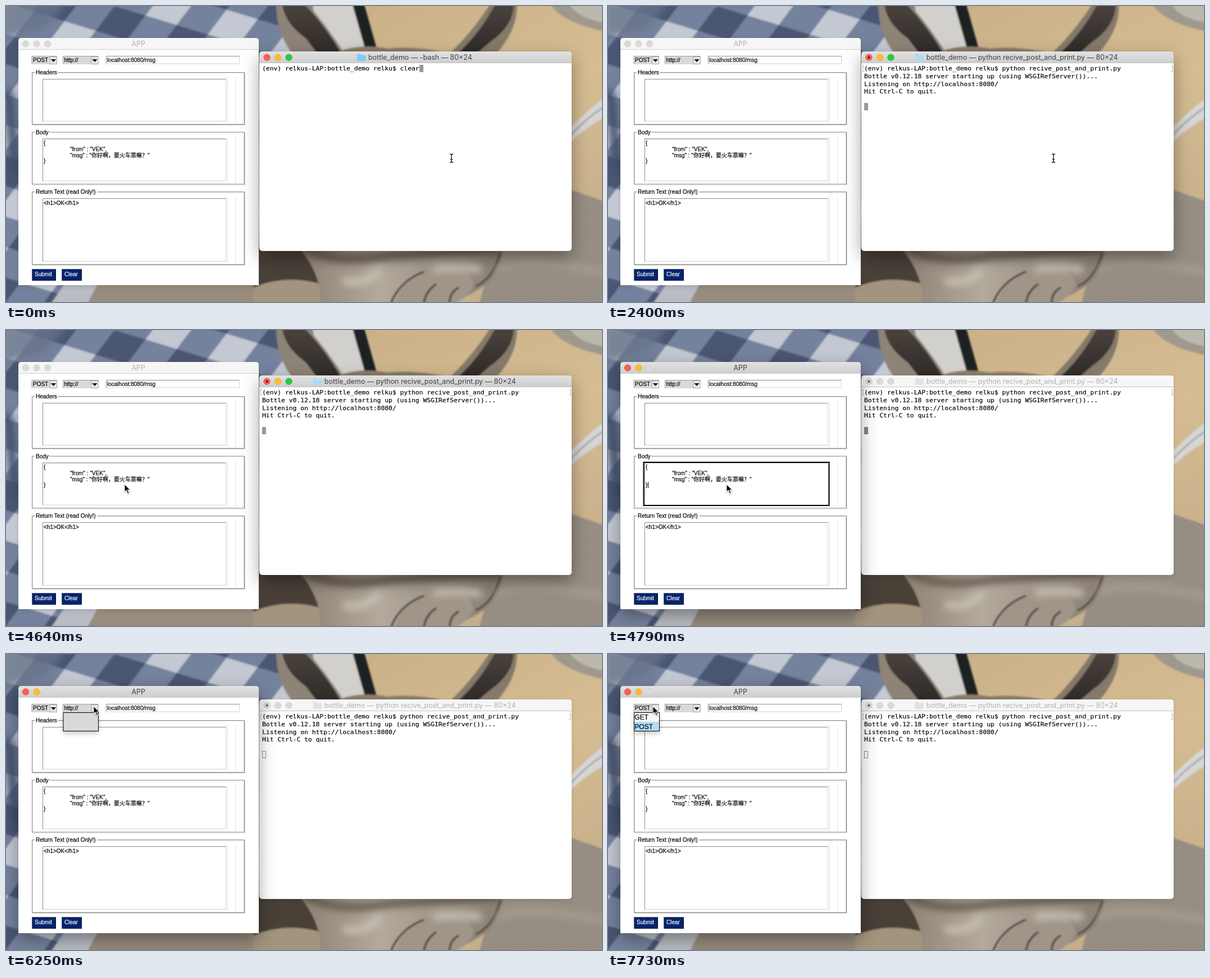
An HTML page for the animation above (8000 ms loop, 1061 by 528 pixels).

```html
<!DOCTYPE html>
<html lang="en">
<head>
<meta charset="utf-8">
<title>Request tool and terminal</title>
<style>
html, body { margin: 0; width: 100%; height: 100%; overflow: hidden; }
#stage { position: relative; width: 1061px; height: 528px; overflow: hidden; background: #cdb48a; }
svg { position: absolute; left: 0; top: 0; display: block; }
.win { position: absolute; background: #fff; }
.win svg { width: 100%; height: 100%; }
#app { left: 22px; top: 57px; width: 428px; height: 441px; border-radius: 5px 5px 0 0; }
#term { left: 451px; top: 81px; width: 556px; height: 356px; border-radius: 5px; }
#app svg { border-radius: 5px 5px 0 0; }
#term svg { border-radius: 5px; }
.win { box-shadow: 0 0 1px rgba(0,0,0,.4), 0 3px 9px rgba(0,0,0,.1); }
.win.active { z-index: 1; box-shadow: 0 0 1px rgba(0,0,0,.5), 0 11px 30px rgba(0,0,0,.36); }
#pointer { z-index: 3; }
text { white-space: pre; }
.ui { font: 10px "Liberation Sans", Arial, "Noto Sans CJK SC", "Noto Sans CJK", sans-serif; }
.ui text { stroke: currentColor; stroke-width: .2; }
.ui .label { color: #fff; }
.list text { font-size: 12px; }
.title { font: 12.45px Inter, "Open Sans", sans-serif; text-anchor: middle; fill: #b2b2b2; }
.mono { font: 11.34px "DejaVu Sans Mono", monospace; }
.mono text { stroke: #000; stroke-width: .15; }
.bar { fill: #f6f6f6; }
.active .bar { fill: url(#chrome); }
.active .title { fill: #404040; }
.light { fill: #dadada; stroke: #c9c9c9; stroke-width: .6; }
.active .red { fill: #fc5b57; stroke: #e0443e; }
.active .yellow { fill: #fdbc2e; stroke: #dea123; }
.active .green { fill: #29c83f; stroke: #1aab29; }
.folder { fill: #e2e2e2; }
.active .folder { fill: #7cccf5; }
.active .busy .folder { fill: #a9dcf6; }
.list { filter: drop-shadow(0 4px 4px rgba(0,0,0,.22)); }
.hide { display: none; }
</style>
</head>
<body>
<div id="stage">
<svg id="wall" width="1061" height="528">
  <defs>
    <pattern id="check" width="116" height="104" patternUnits="userSpaceOnUse" patternTransform="translate(82 -34) rotate(17) skewX(-20)">
      <rect width="116" height="104" fill="#75829d"/>
      <rect width="58" height="52" fill="#4b5773"/>
      <rect x="58" y="52" width="58" height="52" fill="#c3c8d3"/>
    </pattern>
    <pattern id="weave" width="6" height="6" patternUnits="userSpaceOnUse" patternTransform="rotate(32)">
      <rect width="6" height="6" fill="#9d958a"/>
      <path d="M0 1.5H6M1.5 0V6" stroke="#857d73"/>
    </pattern>
    <linearGradient id="wood" x2="1" y2="1">
      <stop stop-color="#bfa67c"/><stop offset=".6" stop-color="#d5bc92"/><stop offset="1" stop-color="#bfa988"/>
    </linearGradient>
    <linearGradient id="ear" x2="0" y2="1">
      <stop stop-color="#4c443e"/><stop offset="1" stop-color="#2c2827"/>
    </linearGradient>
    <linearGradient id="fur" x2="1">
      <stop stop-color="#8c8072"/><stop offset=".4" stop-color="#b3aa9d"/><stop offset="1" stop-color="#877d72"/>
    </linearGradient>
    <filter id="soft"><feGaussianBlur stdDeviation="1.5"/></filter>
    <filter id="blur"><feGaussianBlur stdDeviation="7"/></filter>
  </defs>
  <rect width="1061" height="528" fill="url(#wood)"/>
  <g filter="url(#soft)">
    <path d="M-9-9H580L600 90H450V460L170 540H-9Z" fill="url(#check)"/>
    <path d="M140 540L165 490H470V540Z" fill="#978c7d"/>
    <path d="M74 540L108 490H166L140 540Z" fill="#b9bcc3"/>
    <path d="M545-9H622L658 90H560Z" fill="#d2d0cd"/>
    <path d="M615-9H636L664 90H643Z" fill="#1f2022"/>
    <path d="M570 90Q620 64 680 76Q740 70 810 90Z" fill="#8a7c69"/>
    <path d="M481-9Q480 52 514 90H606Q574 38 532-9Z" fill="#8e8377"/>
    <path d="M491-9Q494 30 534 58L558 90H600Q570 36 526-9Z" fill="url(#ear)"/>
    <path d="M909-9Q914 42 868 90H784Q828 50 866-9Z" fill="#857969"/>
    <path d="M904-9Q906 34 862 64L832 90H798Q844 50 874-9Z" fill="url(#ear)"/>
    <path d="M965-9Q986 30 1070 46V-9Z" fill="#9f998d"/>
    <path d="M1000-9Q1012 22 1070 30V-9Z" fill="#bdb8ae"/>
    <path d="M1070 160Q1034 186 1000 222V247Q1040 210 1070 197Z" fill="#d6d6d6"/>
    <path d="M1070 176Q1030 202 1000 236" fill="none" stroke="#a8a8a9" stroke-width="3"/>
    <path d="M1000 326L1070 350V540H840L870 430H1000Z" fill="url(#weave)"/>
    <path d="M440 430H560Q550 470 590 540H440Z" fill="#494039"/>
    <path d="M440 502Q500 478 560 496V540H440Z" fill="#a3947d"/>
    <path d="M522 430H884Q884 470 858 494Q800 540 700 540H556Q570 492 522 430Z" fill="url(#fur)"/>
    <path d="M690 540Q702 478 770 466Q824 460 832 496Q826 526 770 540Z" fill="#9f9588"/>
    <path d="M682 540Q696 492 744 474M744 540Q742 512 766 496M790 534Q788 512 806 502M836 500Q866 488 880 440" fill="none" stroke="#5a5047" stroke-width="4"/>
  </g>
  <g filter="url(#blur)">
    <path d="M-9-9H110L70 40L-9 60Z" fill="#68748a" opacity=".8"/>
    <path d="M530 430Q580 462 680 446L880 432" fill="none" stroke="#5d5147" stroke-width="12"/>
    <path d="M600 490Q640 500 665 470M760 470Q800 462 846 470" fill="none" stroke="#cbc3b8" stroke-width="12"/>
    <path d="M4 150L18 300" stroke="#414d69" stroke-width="16"/>
    <path d="M870 470Q920 446 1070 476" fill="none" stroke="#b3a999" stroke-width="12" opacity=".6"/>
  </g>
</svg>

<div id="app" class="win"><svg viewBox="22 57 428 441">
  <defs><linearGradient id="chrome" x2="0" y2="1"><stop stop-color="#e2e2e2"/><stop offset="1" stop-color="#cdcdcd"/></linearGradient></defs>
  <rect class="bar" x="22" y="57" width="428" height="21"/>
  <path d="M22 77.5H450" stroke="#d0d0d0"/>
  <circle class="light red" cx="35" cy="67.5" r="5.8"/>
  <circle class="light yellow" cx="54.5" cy="67.5" r="5.8"/>
  <circle class="light" cx="74" cy="67.5" r="5.8"/>
  <text class="title" x="235.7" y="72.3">APP</text>
  <g id="form" class="ui"></g>
  <g id="focus">
    <rect x="63.5" y="236" width="330" height="77" fill="none" stroke="#000" stroke-width="2"/>
    <path id="caret" d="M71.5 271V282" stroke="#000"/>
  </g>
  <g id="lists" class="ui"></g>
</svg></div>

<div id="term" class="win"><svg viewBox="451 81 556 356">
  <rect class="bar" x="451" y="81" width="556" height="21"/>
  <path d="M451 101.5H1007" stroke="#c4c4c4"/>
  <circle class="light red" cx="464.5" cy="91.7" r="5.8"/>
  <circle class="light yellow" cx="484" cy="91.7" r="5.8"/>
  <circle class="light green" cx="503.5" cy="91.7" r="5.8"/>
  <g id="head">
    <path id="folder" class="folder" d="M0 1.5Q0 0 1.5 0H5.5L7.5 2H14Q15.5 2 15.5 3.5V11Q15.5 12.5 14 12.5H1.5Q0 12.5 0 11Z"/>
    <text id="name" class="title" x="737.3" y="96.4"></text>
  </g>
  <g id="busy">
    <circle id="dot" cx="464.5" cy="91.7" r="2"/>
    <path d="M456 106.5H453.5V116.5H456M1002.5 106.5H1005V116.5H1002.5" fill="none" stroke="#b0b0b0"/>
  </g>
  <rect id="block"/>
  <g id="lines" class="mono"></g>
</svg></div>

<svg id="pointer" width="1061" height="528">
  <path id="beam" d="M-3-7.5Q0-7.5 0-5.5Q0-7.5 3-7.5M0-6V6M-3 7.5Q0 7.5 0 5.5Q0 7.5 3 7.5M-2 2H2" fill="none" stroke="#111" stroke-width="1.3"/>
  <path id="arrow" d="M0 0V14L3.2 11L5.8 17L8.3 16L5.7 10.2H10.2Z" stroke="#fff" stroke-width="1.1" style="filter:drop-shadow(0 1px 1px rgba(0,0,0,.35))"/>
</svg>
</div>

<script>
const LOOP = 8000;
const $ = id => document.getElementById(id);
const esc = s => s.replace(/&/g, "&amp;").replace(/</g, "&lt;");
const text = (x, y, s, color = "#000") =>
  `<text x="${x}" y="${y}" fill="${color}" color="${color}">${esc(s)}</text>`;
const rect = (x, y, w, h, fill, stroke = "none") =>
  `<rect x="${x}" y="${y}" width="${w}" height="${h}" fill="${fill}" stroke="${stroke}"/>`;
const line = (d, stroke) => `<path d="${d}" fill="none" stroke="${stroke}"/>`;

// Sunken box: dark top and left, pale bottom and right.
const sunken = (x, y, w, h) => rect(x, y, w, h, "#fff", "#d2d2d2") +
  line(`M${x} ${y + h}V${y}H${x + w}`, "#8c8c8c");

const combo = (id, x, w, label) => rect(x, 89, w, 15, "#d9d9d9") +
  line(`M${x} 103.5V89.5H${x + w}`, "#9c9c9c") + text(x + 2, 100, label) +
  rect(x + w - 12.5, 90.5, 12, 13, "#e9e9e9", "#a5a5a5") +
  `<path id="${id}" d="M${x + w - 11} 95h9l-4.5 5z"/>`;

const group = (label, width, y, h) =>
  rect(47.5, y + 1, 378, h, "none", "#dedede") + rect(46.5, y, 378, h, "none", "#8f8f8f") +
  line(`M47 ${y + h - 1}H424M423.5 ${y}V${y + h}`, "#d0d0d0") +
  rect(51, y - 6, width, 12, "#fff") + text(53, y + 3.5, label) +
  sunken(65.5, y + 12, 326, h - 18) +
  line(`M394.5 ${y + 9}V${y + h - 3}M408.5 ${y + 9}V${y + h - 3}`, "#e0e0e0");

const button = (x, w, label) => rect(x + .5, 469.5, w - 1, 20, "#06246d", "#4d5c88") +
  line(`M${x + 1} 489.5H${x + w - .5}V470`, "#03123a") +
  `<g class="label">${text(x + 5, 482, label, "#fff")}</g>`;

$("form").innerHTML =
  combo("postMark", 46, 45, "POST") + combo("httpMark", 101.5, 63, "http://") +
  sunken(178.5, 89.5, 237, 13.5) + text(180, 100, "localhost:8080/msg") +
  group("Headers", 41, 118.5, 93) + group("Body", 26, 225, 93) + group("Return Text (read Only!)", 112, 331.5, 130) +
  text(67, 248, "{") + text(114, 258.5, '"from" : "VEK",') +
  text(114, 269.5, '"msg" : "你好啊，要火车票嘛？"') + text(67, 280, "}") +
  text(67, 355, "<h1>OK</h1>") +
  button(46, 43, "Submit") + button(99, 36, "Clear");

const list = (id, x, w, items, chosen) => `<g id="${id}" class="list">` +
  rect(x + .5, 104.5, w - 1, 33, "#d9d9d9", "#000") + `<g id="${id}Items">` +
  rect(x + 1, 105, w - 2, 32, "#f7f7f7") + rect(x + 1, 105 + 16 * chosen, w - 2, 16, "#b4dbfb") +
  items.map((s, i) => text(x + 1.3, 117 + 16.5 * i, s)).join("") + "</g></g>";

$("lists").innerHTML = list("http", 101.5, 63.5, ["http://", "https://"], 0) + list("post", 46, 46, ["GET", "POST"], 1);

const PROMPT = "(env) relkus-LAP:bottle_demo relku$ ";
const RUN = "python recive_post_and_print.py";
const OUTPUT = ["Bottle v0.12.18 server starting up (using WSGIRefServer())...",
  "Listening on http://localhost:8080/", "Hit Ctrl-C to quit."];
const CELL = 6.827, ROW = 13.6;

// Time, x, y of the pointer; it jumps from place to place.
const MOVES = [
  [0, 793, 271.5], [3750, 583, 310.5], [3900, 383, 328], [4200, 330, 314], [4350, 272, 295],
  [4490, 226, 280], [4640, 211, 275], [5080, 211, 271], [5230, 210, 262], [5380, 204, 236],
  [5530, 190, 184], [5670, 171, 132], [5820, 160, 102], [5960, 156, 93], [7000, 147, 93],
  [7140, 122, 93], [7290, 94, 93], [7430, 80, 93]
];

const show = (id, on) => $(id).classList.toggle("hide", !on);
const within = (t, a, b) => t >= a && t < b;

function setBlock(col, row, hollow, fill) {
  const inset = hollow ? .5 : 0, block = $("block");
  const box = { x: Math.round(456 + col * CELL) + inset, y: Math.round(105 + row * ROW) + inset,
    width: 7 - 2 * inset, height: 13 - 2 * inset,
    fill: hollow ? "none" : fill, stroke: hollow ? "#8a8a8a" : "none" };
  for (const k in box) block.setAttribute(k, box[k]);
}

let typed = null;
function setLines(rows) {
  const key = rows.join("\n");
  if (key === typed) return;
  typed = key;
  $("lines").innerHTML = rows.map((s, i) => text(456, (115.3 + i * ROW).toFixed(1), s)).join("");
}

function render(t) {
  const running = t >= 2400, front = t >= 4790;
  $("app").classList.toggle("active", front);
  $("term").classList.toggle("active", !front);

  const command = PROMPT + (t < 300 ? "clear" : RUN);
  setLines(running ? [command, ...OUTPUT] : [command]);
  if (running) setBlock(0, 5, t >= 4930, front ? "#858585" : "#989898");
  else setBlock(command.length + (t < 300 ? 0 : 1), 0, false, "#989898");
  $("name").textContent = `bottle_demo — ${running ? RUN : "-bash"} — 80×24`;
  $("folder").setAttribute("transform", `translate(${running ? 546.5 : 625} 85.5)`);
  $("head").setAttribute("class", running ? "busy" : "");
  $("dot").setAttribute("fill", front ? "#5e5e5e" : "#6b0d0a");
  show("busy", running);

  show("focus", within(t, 4790, 6250));
  show("caret", !within(t, 5380, 5670));
  show("http", within(t, 6250, 6850));
  show("httpItems", t >= 6400);
  show("httpMark", !within(t, 6250, 6850));
  show("post", t >= 7730);
  show("postMark", t < 7730);

  const [, x, y] = MOVES.findLast(m => m[0] <= t);
  const beam = t < 3900;
  show("beam", beam);
  show("arrow", !beam);
  $(beam ? "beam" : "arrow").setAttribute("transform", `translate(${x} ${y})`);
}

const start = performance.now();
function tick() {
  render((performance.now() - start) % LOOP);
  requestAnimationFrame(tick);
}
tick();
</script>
</body>
</html>
```
